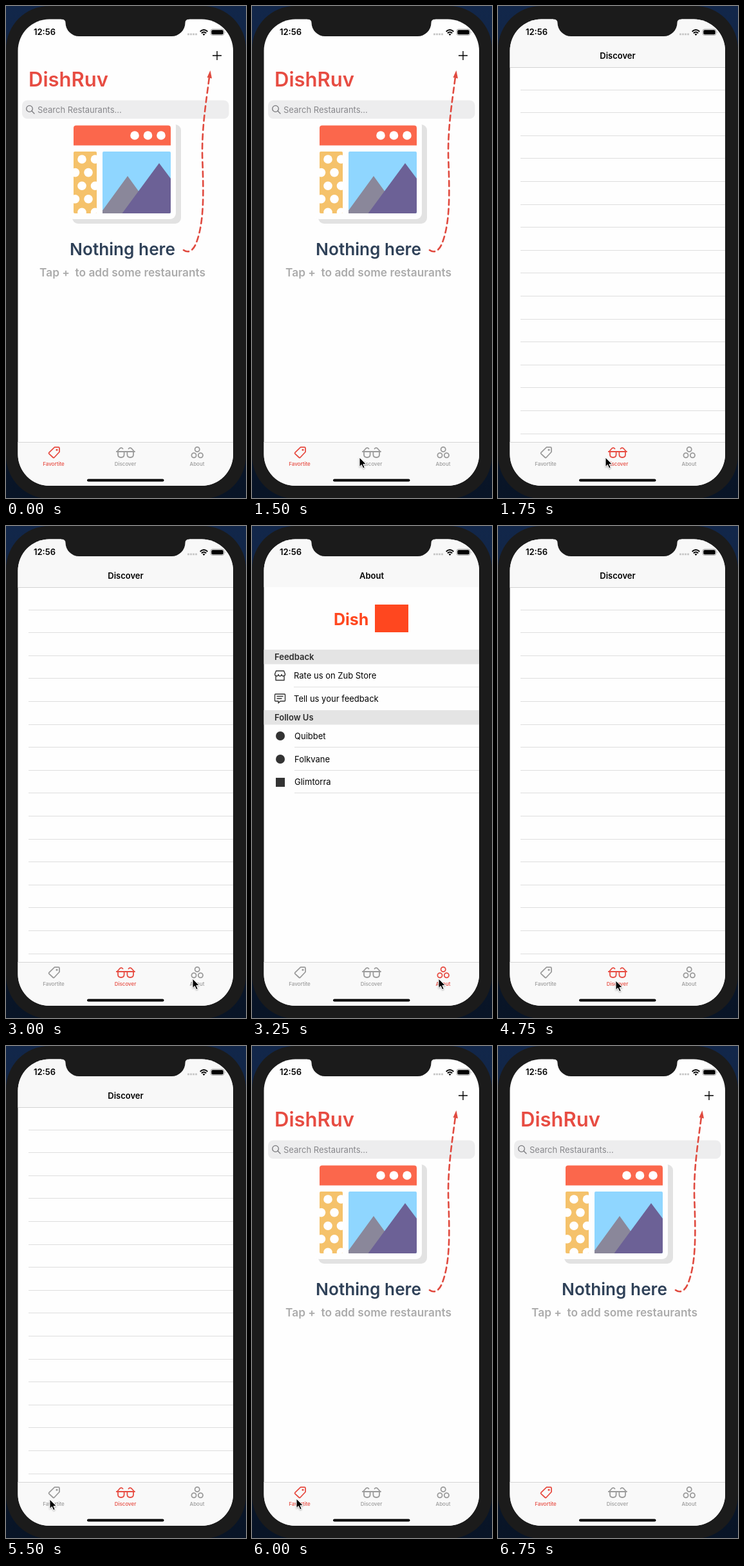
Write an HTML page that moves like this. It is 373x764 px and loops after 7000 ms.

```html
<!DOCTYPE html>
<html lang="en">
<head>
<meta charset="utf-8">
<title>Restaurant app</title>
<style>
  html, body { margin: 0; width: 100%; height: 100%; overflow: hidden; background: #10203a; }
  svg { display: block; width: 373px; height: 764px; font-family: Inter, sans-serif; }
  text { white-space: pre; }
  .bold { font-weight: 600; }
  .mid { text-anchor: middle; }
  .line { fill: none; stroke-width: 1.8; stroke-linecap: round; stroke-linejoin: round; }
  .tab { color: #9b9b9b; font-size: 8px; font-weight: 500; }
  .tab.on { color: #e74c42; }
  .tab text { fill: currentColor; }
  .tab .line { stroke: currentColor; }
  .rule { stroke: #dedede; }
  .row { font-size: 13px; }
</style>
</head>
<body>
<svg viewBox="0 0 373 764">
  <defs>
    <linearGradient id="wall" x2="0" y2="1">
      <stop stop-color="#12274a"/><stop offset="1" stop-color="#081426"/>
    </linearGradient>
    <clipPath id="screen"><rect x="18.500" y="20.500" width="334.500" height="724.500" rx="49"/></clipPath>
    <clipPath id="panel"><rect x="105" y="226" width="36" height="96" rx="2"/></clipPath>
    <filter id="shade" x="-50%" y="-50%" width="200%" height="200%">
      <feDropShadow dx="0" dy="1" stdDeviation="1" flood-opacity=".35"/>
    </filter>
  </defs>

  <rect width="373" height="764" fill="url(#wall)"/>
  <rect width="373" height="765" rx="67" fill="#1b1b1b"/>

  <g clip-path="url(#screen)">
    <rect x="18" y="20" width="335" height="725" fill="#fefefe"/>

    <g id="favorite">
      <path d="M328 70V84M321 77H335" stroke="#000" stroke-width="1.4"/>
      <text class="bold" x="35" y="125" font-size="31" fill="#e74c42">DishRuv</text>
      <rect x="25" y="146.500" width="321.500" height="28.500" rx="8" fill="#ededee"/>
      <g class="line" stroke="#77777b" style="stroke-width:1.3">
        <circle cx="36.500" cy="159.500" r="4.800"/><path d="M40.200 163.200L44 167"/>
      </g>
      <text x="49" y="165.500" font-size="13" fill="#87878b">Search Restaurants...</text>

      <rect x="103" y="184" width="169" height="154" rx="9" fill="#e2e2e2"/>
      <rect x="96" y="177" width="168" height="154" rx="9" fill="#fefefe"/>
      <path d="M105 216.500V189.500Q105 185.500 109 185.500H252Q256 185.500 256 189.500V216.500Z" fill="#fb674c"/>
      <g fill="#fff">
        <circle cx="200" cy="201" r="6.800"/><circle cx="220.500" cy="201" r="6.800"/><circle cx="241" cy="201" r="6.800"/>
      </g>
      <g clip-path="url(#panel)">
        <rect x="105" y="226" width="36" height="96" fill="#f5c26b"/>
        <g id="dots" fill="#fff"></g>
      </g>
      <rect x="150" y="226" width="106" height="96" rx="2" fill="#8fd6ff"/>
      <path d="M150 322V317.500L189 264L231 322Z" fill="#8a879a"/>
      <path d="M180.500 322L238 244L256 268V320Q256 322 254 322Z" fill="#6c6196"/>

      <text class="bold mid" x="181" y="387" font-size="26.200" fill="#2f4158">Nothing here</text>
      <text class="bold mid" x="181" y="419.500" font-size="17.300" fill="#ababab">Tap +  to add some restaurants</text>
      <path class="line" style="stroke-width:2.600" stroke="#e04a3f" stroke-dasharray="8.500 6"
        d="M276 379C283 384 291 381 296 367C308 335 307 290 305.500 245C303 195 311 150 316 110"/>
      <path d="M317.500 100L312.500 111L320 112.500Z" fill="#e04a3f"/>
    </g>

    <g id="discover">
      <rect x="18" y="20" width="335" height="75" fill="#f8f8f8"/>
      <path d="M18 95.500H353" stroke="#d2d2d2"/>
      <text class="row bold mid" x="186" y="82">Discover</text>
      <path id="rows" class="rule"/>
    </g>

    <g id="about">
      <rect x="18" y="20" width="335" height="75" fill="#f8f8f8"/>
      <text class="row bold mid" x="186" y="82">About</text>
      <text x="127" y="153.500" font-size="25" font-weight="700" fill="#ff471f">Dish</text>
      <rect x="191" y="122" width="52" height="43" fill="#ff471f"/>
      <path d="M18 192H353V214.500H18ZM18 286H353V308.500H18Z" fill="#e4e4e4"/>
      <g class="row bold" fill="#2c2c2c">
        <text x="35" y="208">Feedback</text><text x="35" y="302">Follow Us</text>
      </g>
      <path class="rule" d="M65 250H353M66 343.500H353M66 379.500H353M66 414.500H353"/>
      <g class="row">
        <text x="65" y="237">Rate us on Zub Store</text>
        <text x="65" y="273">Tell us your feedback</text>
        <text x="66" y="331">Quibbet</text>
        <text x="66" y="366.500">Folkvane</text>
        <text x="66" y="402">Glimtorra</text>
      </g>
      <g class="line" stroke="#333" style="stroke-width:1.4">
        <path d="M37.500 225H49.500L51.500 230Q51.500 233 48.700 233Q46.200 233 46 230.500Q45.800 233 43.500 233Q41.200 233 41 230.500Q40.800 233 38.300 233Q35.500 233 35.500 230ZM37 234V239.500H50V234"/>
        <path d="M36.500 261H50.500Q51.500 261 51.500 262V271Q51.500 272 50.500 272H44L41 275V272H36.500Q35.500 272 35.500 271V262Q35.500 261 36.500 261ZM39 264.500H48M39 268H46"/>
      </g>
      <g fill="#333">
        <circle cx="44" cy="326" r="7"/><circle cx="44" cy="362" r="7"/>
        <rect x="37" y="391" width="14" height="14"/>
      </g>
    </g>

    <rect x="18" y="677" width="335" height="68" fill="#f9f9f9"/>
    <path d="M18 677.500H353" stroke="#d6d6d6"/>
    <g class="tab" data-screen="favorite">
      <path class="line" d="M75.500 685.200H81.500Q83 685.200 83 686.700V692.500L75 701Q74 702 73 701L67 695.300Q66 694.300 67 693.300Z"/>
      <circle cx="79" cy="689.200" r="1.500" fill="currentColor"/>
      <text class="mid" x="74" y="714">Favortite</text>
    </g>
    <g class="tab" data-screen="discover">
      <path class="line" d="M171.800 692H200M173 691.500L177 687Q179.500 685 181.500 687.500M199 691.500L195 687Q192.500 685 190.500 687.500M174 692.500V696.500Q174 701 178.800 701Q183.600 701 183.600 696.500V692.500M188.400 692.500V696.500Q188.400 701 193.200 701Q198 701 198 696.500V692.500"/>
      <text class="mid" x="185.500" y="714">Discover</text>
    </g>
    <g class="tab" data-screen="about">
      <g class="line">
        <circle cx="297.200" cy="688.500" r="3.600"/><circle cx="292" cy="697.700" r="3.600"/><circle cx="302.400" cy="697.700" r="3.600"/>
      </g>
      <text class="mid" x="297" y="714">About</text>
    </g>
    <rect x="126" y="734.500" width="119.500" height="4" rx="2"/>

    <text class="row bold" x="43" y="45">12:56</text>
    <path d="M282 43.800H297" stroke="#c8c8c8" stroke-width="2.800" stroke-dasharray="3 1"/>
    <g fill="none" stroke="#000" stroke-width="2">
      <path d="M301.700 39.700Q307.500 34.300 313.300 39.700M303.900 42.200Q307.500 38.900 311.100 42.200"/>
      <path d="M307.500 46L305.500 43.800Q307.500 42.300 309.500 43.800Z" fill="#000" stroke="none"/>
    </g>
    <rect x="318" y="36" width="21" height="9.500" rx="3" fill="none" stroke="#a8a8a8"/>
    <rect x="319.300" y="37.200" width="18.400" height="7.100" rx="1.800"/>
    <path d="M340.300 39Q342 40.700 340.300 42.500Z" fill="#a8a8a8"/>
  </g>

  <path fill="#1b1b1b" d="M86 19V20.500Q92.500 20.500 92.500 26A21 21 0 0 0 113.500 47H257.500A21 21 0 0 0 278.500 26Q278.500 20.500 285 20.500V19Z"/>
  <path id="cursor" filter="url(#shade)" stroke="#fff" stroke-width="1" stroke-linejoin="round"
    d="M0 0V14.500L3.300 11.400L5.700 16.800L8.200 15.700L5.900 10.500H10.400Z"/>
</svg>
<script>
  const LOOP = 7000;
  const byId = id => document.getElementById(id);

  // [start ms, screen]
  const screens = [[0, "favorite"], [1750, "discover"], [3250, "about"], [4750, "discover"], [6000, "favorite"]];
  // [start ms, tip x, tip y]; no position hides the pointer
  const pointer = [
    [0], [750, 198, 728], [1000, 158, 700], [1250, 164, 701], [1500, 167, 701],
    [2000, 168, 702], [2500, 262, 702], [2750, 287, 704], [3000, 290, 703],
    [3750, 288, 705], [4000, 205, 708], [4250, 183, 706], [5000, 117, 710],
    [5250, 99, 709], [5500, 68, 704], [6000, 69, 703], [6250]
  ];
  const stepAt = (steps, t) => steps.findLast(step => step[0] <= t);

  let dots = "";
  for (let row = 0; row < 5; row++)
    for (let col = 0; col < 2; col++)
      dots += `<circle cx="${(row % 2 ? 107.5 : 118) + col * 20.5}" cy="${238 + row * 20.6}" r="6.8"/>`;
  byId("dots").innerHTML = dots;

  byId("rows").setAttribute("d",
    Array.from({ length: 16 }, (_, i) => `M35 ${Math.floor(130 + i * 35.6) + 0.5}H353`).join(""));

  function draw() {
    const t = performance.now() % LOOP;
    const active = stepAt(screens, t)[1];
    for (const tab of document.querySelectorAll(".tab")) {
      const on = tab.dataset.screen === active;
      tab.classList.toggle("on", on);
      byId(tab.dataset.screen).style.display = on ? "" : "none";
    }
    const [, x, y] = stepAt(pointer, t);
    const cursor = byId("cursor");
    cursor.style.display = x === undefined ? "none" : "";
    if (x !== undefined) cursor.setAttribute("transform", `translate(${x} ${y})`);
    requestAnimationFrame(draw);
  }
  draw();
</script>
</body>
</html>
```
